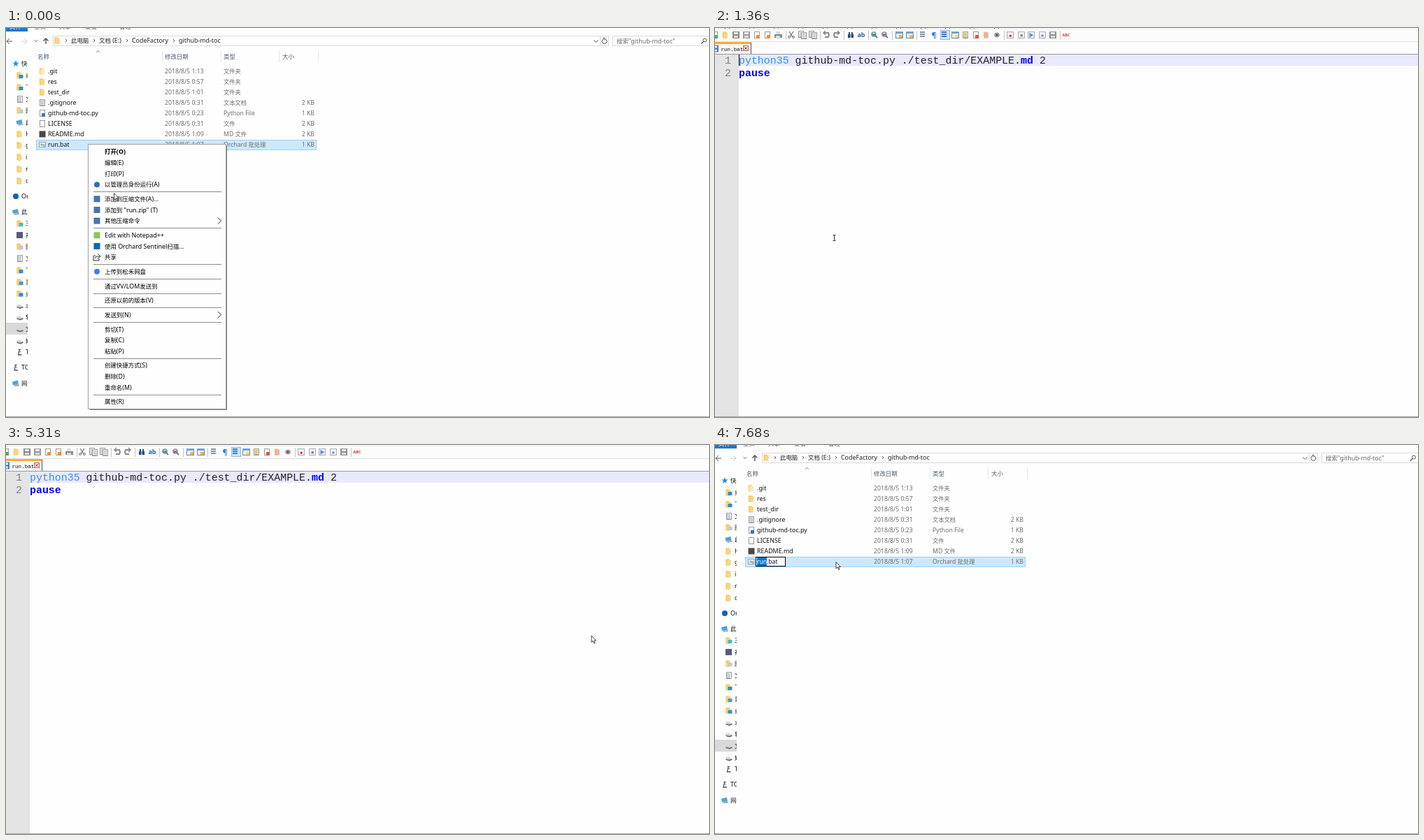
Write an HTML page with a canvas that moves like this. It is 1005 px wide and 557 px high and loops after 8 s.

```html
<!DOCTYPE html>
<html lang="zh">
<head>
<meta charset="utf-8">
<style>
html, body { margin: 0; width: 100%; height: 100%; overflow: hidden; background: #fefefe; }
canvas { display: block; }
</style>
</head>
<body>
<canvas id="stage" width="1005" height="557"></canvas>
<script>
const g = document.getElementById('stage').getContext('2d');
const LOOP = 8000;
const LATIN = '"Noto Sans",sans-serif';
const CJK = '"Noto Sans CJK SC","Noto Sans CJK",sans-serif';
const MONO = '"Liberation Mono",monospace';

// ---- Timing: the picture only changes at these steps ----
const spans = [[0, 0, 1], [120, 480, 4], [630, 630, 1], [1000, 1360, 4], [1630, 2350, 7], [2470, 3190, 7],
  [3310, 3430, 2], [3580, 4310, 7], [4460, 5190, 7], [5310, 5310, 1], [5450, 5930, 5], [6180, 6900, 7], [7680, 7680, 1]];
const steps = spans.flatMap(([a, b, n]) => Array.from({length: n}, (_, i) => a + (n > 1 ? (b - a) * i / (n - 1) : 0)));

const path = [[0, 154, 236], [480, 170, 300], [630, 170, 300.5], [1510, 170, 300], [1630, 204, 284], [1750, 261, 228],
  [1870, 236, 180], [2230, 120, 95], [2350, 95, 78], [2830, 191, 66], [3190, 132, 68], [3430, 360, 70],
  [3580, 430, 76], [4310, 870, 98], [4460, 930, 130], [4700, 940, 200], [5190, 836.5, 272.5], [5310, 836.5, 272.5],
  [5930, 400, 227], [6180, 395.5, 222.5], [6900, 172.5, 167], [LOOP, 172.5, 167]];

function pointer(t) {
  const i = path.findIndex(k => k[0] > t);
  const [a, x, y] = path[i - 1], [b, u, v] = path[i];
  const f = (t - a) / (b - a);
  return [x + (u - x) * f, y + (v - y) * f];
}

// ---- Drawing helpers ----
function rect(x, y, w, h, c) { g.fillStyle = c; g.fillRect(x, y, w, h); }
function frame(x, y, w, h, c) { g.strokeStyle = c; g.lineWidth = 1; g.strokeRect(x + .5, y + .5, w - 1, h - 1); }
function disc(x, y, r, c) { g.fillStyle = c; g.beginPath(); g.arc(x, y, r, 0, 7); g.fill(); }
function line(c, w, ...p) {
  g.strokeStyle = c; g.lineWidth = w; g.beginPath();
  for (let i = 0; i < p.length; i += 2) g.lineTo(p[i], p[i + 1]);
  g.stroke();
}
function ring(x, y, r, c, w, a = 0, b = 7) {
  g.strokeStyle = c; g.lineWidth = w; g.beginPath(); g.arc(x, y, r, a, b); g.stroke();
}
// Mixed text, centred on y; Chinese runs are set slightly smaller.
function text(s, x, y, c = '#000', size = 8.9, weight = '') {
  g.fillStyle = c;
  for (const run of s.match(/[\u3000-\u9fff]+|[^\u3000-\u9fff]+/g)) {
    const han = run > '\u3000';
    g.font = `${weight} ${han ? size * .95 : size}px ${han ? CJK : LATIN}`;
    g.fillText(run, x, y + 3.2);
    x += g.measureText(run).width;
  }
}
function code(s, x, y, c, weight = '', size = 14.93) {
  g.font = `${weight} ${size}px ${MONO}`;
  g.fillStyle = c;
  g.fillText(s, x, y);
}
// Chevron pointing along dx, dy
function chevron(x, y, dx, dy, c = '#555') {
  line(c, 1, x - dx - 2 * dy, y - dy - 2 * dx, x + dx, y + dy, x - dx + 2 * dy, y - dy + 2 * dx);
}

// ---- Icons, centred on x, y ----
const icon = {
  folder(x, y, c = '#fad679') { rect(x - 4, y - 4.5, 5, 9, '#efc04f'); rect(x - 3, y - 3.5, 6, 8, c); },
  page(x, y, c) {
    x = Math.round(x); y = Math.round(y);
    rect(x - 4, y - 5, 8, 10, '#fff'); frame(x - 4, y - 5, 8, 10, '#999');
    if (c) rect(x - 1, y, 5, 5, c);
  },
  lines(x, y, c = '#9aa4ae') {
    icon.page(x, y);
    for (let i = -2.5; i < 4; i += 2) line(c, 1, x - 2.5, y + i, x + 2.5, y + i);
  },
  badge(x, y, c) { icon.folder(x, y); rect(x - 1, y - 1, 6, 5, c); },
  batch(x, y) { rect(x - 5, y - 4, 10, 8, '#f4f6f8'); frame(x - 5, y - 4, 10, 8, '#8fa0b0'); ring(x - 1, y, 1.2, '#888', 1); ring(x + 2, y + 1, 1.2, '#888', 1); },
  pc(x, y) {
    g.fillStyle = '#4fa3da'; g.beginPath();
    g.moveTo(x - 5, y - 2); g.lineTo(x + 3, y - 4); g.lineTo(x + 4, y + 2); g.lineTo(x - 4, y + 3); g.fill();
    line('#999', 1.5, x - 2, y + 4, x + 5, y + 3);
  },
  drive(x, y) {
    g.fillStyle = '#d4d4d4'; g.beginPath();
    g.moveTo(x - 5, y); g.lineTo(x - 1, y - 2); g.lineTo(x + 5, y + 1); g.lineTo(x + 2, y + 3); g.fill();
    line('#666', 1.8, x - 4, y + 2, x + 1, y + 3.5, x + 5, y + 2);
  },
  disk(x, y, c = '#8a8a8a') { rect(x - 5, y - 5, 10, 10, c); rect(x - 3, y - 4, 6, 3, '#eee'); rect(x - 3, y + 1, 6, 3, '#ddd'); },
  star(x, y) {
    g.fillStyle = '#2b8ad6'; g.beginPath();
    for (let i = 0; i < 10; i++) {
      const a = i * Math.PI / 5 - 1.57, r = i % 2 ? 2 : 5;
      g.lineTo(x + r * Math.cos(a), y + r * Math.sin(a));
    }
    g.fill();
  },
  dot(x, y, c) { disc(x, y, 4, c); },
  box(x, y, c) { rect(x - 4.5, y - 4.5, 9, 9, c); },
  copy(x, y) { icon.lines(x - 2, y - 1, '#aaa'); icon.lines(x + 2, y + 1, '#aaa'); },
  printer(x, y) { rect(x - 3, y - 5, 6, 4, '#ddd'); rect(x - 5, y - 1, 11, 5, '#888'); rect(x - 3, y + 1, 6, 4, '#cde'); },
  cut(x, y) { line('#777', 1.3, x - 3, y - 5, x + 2, y + 3); line('#777', 1.3, x + 3, y - 5, x - 2, y + 3); ring(x - 3, y + 3, 1.5, '#777', 1); ring(x + 3, y + 3, 1.5, '#777', 1); },
  // s = 1 turns right to left at the far end, -1 mirrors it
  turn(x, y, s) { line('#888', 2, x - 4 * s, y - 3, x + 3 * s, y - 3, x + 4 * s, y, x + 3 * s, y + 3, x - 2 * s, y + 3); line('#888', 1.5, x - s, y - 6, x - 4 * s, y - 3, x - s, y); },
  find(x, y) { rect(x - 4, y - 1, 3.5, 5, '#234a80'); rect(x + .5, y - 1, 3.5, 5, '#234a80'); rect(x - 3, y - 4, 2, 3, '#234a80'); rect(x + 1, y - 4, 2, 3, '#234a80'); },
  zoom(x, y, c) { ring(x - 1, y - 1, 3, '#6f8fb0', 1.5); line('#777', 2, x + 1, y + 1, x + 4, y + 4); rect(x - 3, y - 2, 4, 3, c); },
  pane(x, y, c) { rect(x - 5, y - 4, 11, 9, '#eef4ff'); frame(x - 5, y - 5, 11, 10, '#5f87b5'); rect(x - 5, y - 5, 11, 3, '#74a0d4'); rect(x, y, 5, 4, c); },
  wrap(x, y, c) { for (let i = -4; i < 5; i += 3) line(c, 1.5, x - 5, y + i, x + (i ? 2 : 5), y + i); },
  glyph(x, y, [s, c, size]) { g.font = `bold ${size}px ${LATIN}`; g.fillStyle = c; g.textAlign = 'center'; g.fillText(s, x, y + size * .36); g.textAlign = 'left'; },
  key(x, y, [s, c]) { rect(x - 5, y - 5, 10, 10, '#f2f2f2'); frame(x - 5, y - 5, 10, 10, '#aab'); icon.glyph(x, y, [s, c, 7]); },
  eye(x, y) { g.fillStyle = '#ddd'; g.beginPath(); g.ellipse(x, y, 5, 3, 0, 0, 7); g.fill(); ring(x, y, 3, '#777', 1); disc(x, y, 1.7, '#345'); },
  share(x, y) { line('#333', 1, x - 2, y - 2, x - 5, y - 2, x - 5, y + 5, x + 3, y + 5, x + 3, y + 2); line('#333', 1, x - 3, y + 2, x - 1, y - 1, x + 4, y - 1); line('#333', 1, x + 1, y - 5, x + 5, y - 1, x + 1, y + 2); },
  tower(x, y) { line('#555', 1, x - 2, y - 3.5, x + 2, y - 3.5); line('#555', 1.3, x, y - 4, x - 1, y, x - 2, y + 4, x + 3, y + 4); line('#777', 1, x - 2, y - .5, x + 2, y - .5); },
  none() {}
};

// ---- File manager ----
const files = [['.git', '1:13', '文件夹', '', 'folder', '#fdeab4'], ['res', '0:57', '文件夹', '', 'folder'],
  ['test_dir', '1:01', '文件夹', '', 'folder'], ['.gitignore', '0:31', '文本文档', '2 KB', 'lines'],
  ['github-md-toc.py', '0:23', 'Python File', '1 KB', 'page', '#3d76ae'], ['LICENSE', '0:31', '文件', '2 KB', 'page'],
  ['README.md', '1:09', 'MD 文件', '2 KB', 'box', '#494949'], ['run.bat', '1:07', 'Orchard 批处理', '1 KB', 'batch']];
const BLUE = '#2c8fdb';
const side = [[51, 0, 'star', '快速'], [68, 1, 'badge', '桌面', BLUE], [85, 1, 'badge', '下载', BLUE], [102, 1, 'lines', '文档'],
  [118, 1, 'badge', '图片', '#b8cbd8'], [135, 1, 'pc', '此电'], [152, 1, 'folder', 'H'], [168, 1, 'folder', 'g'],
  [185, 1, 'folder', 'i'], [202, 1, 'folder', 'r'], [219, 1, 'folder', 'c'], [241, 0, 'dot', 'Or', '#0a64b4'],
  [263, 0, 'pc', '此电'], [280, 1, 'badge', '3D', '#4bb7c9'], [296.5, 1, 'box', '视频', '#585b7c'], [313, 1, 'badge', '图片', '#b8cbd8'],
  [330, 1, 'lines', '文档'], [347, 1, 'badge', '下载', BLUE], [364, 1, 'badge', '音乐', '#3ea0dc'], [380.5, 1, 'badge', '桌面', BLUE],
  [397.5, 1, 'drive', '本地'], [414, 1, 'drive', '软件'], [431, 1, 'drive', '文档'], [448, 1, 'drive', '娱乐'],
  [464, 1, 'tower', 'TC'], [486, 0, 'tower', 'TC'], [508.5, 0, 'pc', '网络']];

function explorer(renaming) {
  // ribbon tabs cut off by the top edge
  rect(0, 0, 31, 5, '#1979ca');
  text('文件', 5, -2, '#fff');
  ['主页', '共享', '查看', '管理'].forEach((s, i) => text(s, [40, 76, 113, 162][i], -2, '#666'));
  // address bar
  line('#555', 1, 9, 19, 1, 19); line('#555', 1, 5, 15, 1, 19, 5, 23);
  line('#ccc', 1, 22, 19, 30, 19); line('#ccc', 1, 26, 15, 30, 19, 26, 23);
  chevron(43, 18.5, 0, 1.1);
  line('#444', 1.3, 57, 23, 57, 15); line('#444', 1.3, 53.5, 18.5, 57, 15, 60.5, 18.5);
  frame(67, 11, 795, 15, '#dadada'); frame(867, 11, 140, 15, '#dadada');
  icon.folder(73.5, 18);
  ['此电脑', '文档 (E:)', 'CodeFactory', 'github-md-toc'].forEach((s, i) => {
    const x = [93, 133, 180, 247][i];
    chevron(x - 7, 18, 1, 0);
    text(s, x, 18, '#222');
  });
  chevron(843.5, 19, 0, 1.5);
  line('#dadada', 1, 849.5, 12, 849.5, 25);
  ring(855.5, 19, 3.5, '#555', 1, -.8, 4.6); line('#555', 1, 855, 13, 855, 16, 858, 16);
  text('搜索"github-md-toc"', 873, 18.5, '#6d6d6d');
  ring(999, 17.5, 2.5, '#555', 1); line('#555', 1.3, 997, 19.5, 994, 22.5);
  // column heads
  chevron(131.5, 33.5, 0, -1.2, '#777');
  ['名称', '修改日期', '类型', '大小'].forEach((s, i) => {
    text(s, [45, 227, 311, 395][i], 40.5, '#4c5a70');
    rect([223, 307, 390, 446][i], 32, 1, 17, '#e5e5e5');
  });
  // rows
  rect(43, 160, 401, 15, '#cce8ff'); frame(43, 160, 401, 15, '#99d1ff');
  files.forEach(([name, time, type, size, kind, c], i) => {
    const y = 61.5 + i * 15.05;
    icon[kind](52, Math.round(y), c);
    text(name, 60, y, '#111');
    text('2018/8/5 ' + time, 227, y, '#6d6d6d', 8.7);
    text(type, 311, y, '#6d6d6d', 8.7);
    g.textAlign = 'right';
    if (size) text(size, 441, y, '#6d6d6d', 8.7);
    g.textAlign = 'left';
  });
  if (renaming) {
    rect(58, 160, 43, 14, '#fff'); frame(58, 160, 43, 14, '#000');
    rect(60, 161, 14, 12, '#0078d7');
    text('run', 60, 167, '#fff', 8.6); text('.bat', 74, 167, '#111', 8.6);
  }
  // navigation pane
  g.save();
  g.beginPath(); g.rect(0, 27, 31, 528); g.clip();
  rect(0, 422, 31, 17, '#d9d9d9');
  for (const [y, deep, kind, s, c] of side) {
    icon[kind](deep ? 19.5 : 14, y, c);
    text(s, deep ? 28 : 22, y, '#111');
  }
  g.restore();
}

// Blank entries are separators; '>' marks a submenu.
const items = [['打开(O)'], ['编辑(E)'], ['打印(P)'], ['以管理员身份运行(A)', 'dot', '#2f6db5'], [],
  ['添加到压缩文件(A)...', 'box', '#4777a8'], ['添加到 "run.zip" (T)', 'box', '#4777a8'], ['其他压缩命令>', 'box', '#4777a8'], [],
  ['Edit with Notepad++', 'box', '#8fc35a'], ['使用 Orchard Sentinel扫描...', 'box', '#0d67b8'], ['共享', 'share'], [],
  ['上传到松禾网盘', 'dot', '#3f7de8'], [], ['通过VV/LOM发送到'], [], ['还原以前的版本(V)'], [], ['发送到(N)>'], [],
  ['剪切(T)'], ['复制(C)'], ['粘贴(P)'], [], ['创建快捷方式(S)'], ['删除(D)'], ['重命名(M)'], [], ['属性(R)']];

function menu(pointerY) {
  const hovering = pointerY > 237;
  rect(120, 169, 196, 378, '#777');
  rect(117, 166, 198, 380, '#fefefe'); frame(117, 166, 198, 380, '#a0a0a0');
  if (hovering) rect(119, 235, 195, Math.min(pointerY, 289) - 235, '#f0f0f0');
  let y = 177.2;
  for (const [label, kind = 'none', c] of items) {
    if (!label) {
      rect(125, Math.round(y - 5.4), 183, 1, '#8c8c8c');
      y += 5;
      continue;
    }
    if (hovering && Math.abs(pointerY - y) < 7.8) rect(119, Math.round(y - 8), 195, 16, '#dadada');
    icon[kind](130, y, c);
    text(label.replace('>', ''), 141, y, '#000', 8.9, y < 180 ? 'bold' : '');
    if (label.endsWith('>')) line('#222', 1, 303, y - 4.5, 307.5, y, 303, y + 4.5);
    y += 15.65;
  }
}

// ---- Text editor ----
const tools = [[0, 'page', '#4caf50'], [15, 'folder'], [30, 'disk'], [45, 'disk', '#9a9a9a'], [60, 'page', '#f08c3a'], [75, 'page', '#f08c3a'],
  [90, 'printer'], [109, 'cut'], [125, 'copy'], [140, 'copy'], [159, 'turn', 1], [174, 'turn', -1], [194, 'find'],
  [209, 'glyph', ['ab', '#2862b0', 9]], [228, 'zoom', '#3caa55'], [243, 'zoom', '#e0566a'], [263, 'pane', '#f1b53d'], [278, 'pane', '#f1b53d'],
  [298, 'wrap', '#5d7288'], [313, 'glyph', ['¶', '#2f7fe0', 11]], [329, 'wrap', '#1d55c4'], [343, 'pane', '#f6df62'], [358, 'lines', '#b79a19'],
  [373, 'page', '#d8514d'], [388, 'folder', '#efb0a8'], [403, 'eye'], [422, 'key', ['●', '#d0021b']], [438, 'key', ['■', '#888']],
  [452, 'key', ['▶', '#6a8fc0']], [468, 'key', ['»', '#1e64d0']], [483, 'disk', '#909090'], [502, 'glyph', ['ABC', '#c33', 5.5]]];

// Bracket ends of a menu bar just above the edge
function menuBarRemains() {
  for (let i = 0; i < 12; i++) {
    rect(14 + i * 35, 0, 1, 1, '#555');
    rect(20 + i * 35, 0, 1, 1, '#777');
  }
}

function editor(t) {
  rect(0, 0, 1005, 37, '#fcfcfc');
  if (t < 5310) menuBarRemains();
  rect(0, 1, 1005, 1, '#eee');
  rect(322, 3, 14, 14, '#cde4fb'); frame(322, 3, 14, 14, '#8cbdea');
  for (const [x, kind, c] of tools) icon[kind](x, 10, c);
  for (const x of [101, 150, 184, 219, 253, 288, 413, 493]) rect(x, 4, 1, 13, '#c4c4c4');
  rect(0, 19, 1005, 1, '#e2e2e2');
  rect(0, 20, 52, 17, '#f6f6f6'); rect(0, 20, 52, 3, '#faaa3c'); rect(51, 21, 1, 16, '#555');
  icon.disk(0, 29.5, '#3d7fc4');
  code('run.bat', 8.5, 32.5, '#111', '', 7.6);
  rect(40, 25, 8, 8, '#fbe4e4'); frame(40, 25, 8, 8, '#b66');
  line('#b33', 1, 42, 27, 46, 31); line('#b33', 1, 46, 27, 42, 31);
  rect(0, 37, 1005, 1, '#9a9aa2');
  rect(0, 38, 34, 518, '#e4e4e4');
  rect(34, 38, 971, 16, '#e8e8ff');
  code('1', 14, 51, '#808080'); code('2', 14, 68.5, '#808080');
  const w = 14.93 * .6;
  code('python35', 34, 51, '#2f92ff');
  code('github-md-toc.py ./test_dir/EXAMPLE.', 34 + 9 * w, 51, '#222');
  code('md', 34 + 45 * w, 51, '#00f', 'bold');
  code('2', 34 + 48 * w, 51, '#222');
  code('pause', 34, 68.5, '#00f', 'bold');
  if (Math.floor((t - 1360) / 530) % 2 === 0) rect(34, 38, 1, 16, '#000');
}

// ---- Pointers ----
function arrow(x, y) {
  const p = [0, 0, 0, 9.5, 2.2, 7.5, 3.7, 11, 5.2, 10.4, 3.7, 7, 6.5, 7];
  g.beginPath();
  for (let i = 0; i < p.length; i += 2) g.lineTo(x + p[i] + .5, y + p[i + 1] + .5);
  g.closePath();
  g.fillStyle = '#fff'; g.fill();
  g.strokeStyle = '#333'; g.lineWidth = .9; g.stroke();
}
function beam(x, y) {
  line('#333', 1, x + .5, y - 3.5, x + .5, y + 4.5);
  line('#333', 1, x - 1.5, y - 3.5, x + 2.5, y - 3.5);
  line('#333', 1, x - 1.5, y + 4.5, x + 2.5, y + 4.5);
}
function busy(x, y) {
  ring(x, y, 4.3, '#1c8ff2', 2.6);
  ring(x, y, 4.3, '#45b4fa', 2.6, 2.2, 4.2);
}

function draw(t) {
  const [x, y] = pointer(t);
  rect(0, 0, 1005, 557, '#fefefe');
  if (t < 1120 || t >= 5450) explorer(t >= 7680);
  else if (t < 1360) { menuBarRemains(); rect(0, 2, 1005, 1, '#e6e6e6'); }
  else editor(t);
  if (t < 1000) menu(y);
  rect(0, 556, 1005, 1, '#a6a6a6');
  if (t >= 1000 && t < 1360) busy(169.5, 301);
  else if (t >= 1360 && t < 5190) beam(x, y);
  else arrow(x, y);
}

let shown = -1;
function tick(now) {
  const t = now % LOOP;
  const step = steps.filter(s => s <= t + .01).pop();
  if (step !== shown) draw(shown = step);
  requestAnimationFrame(tick);
}
draw(0);
requestAnimationFrame(tick);
</script>
</body>
</html>
```
